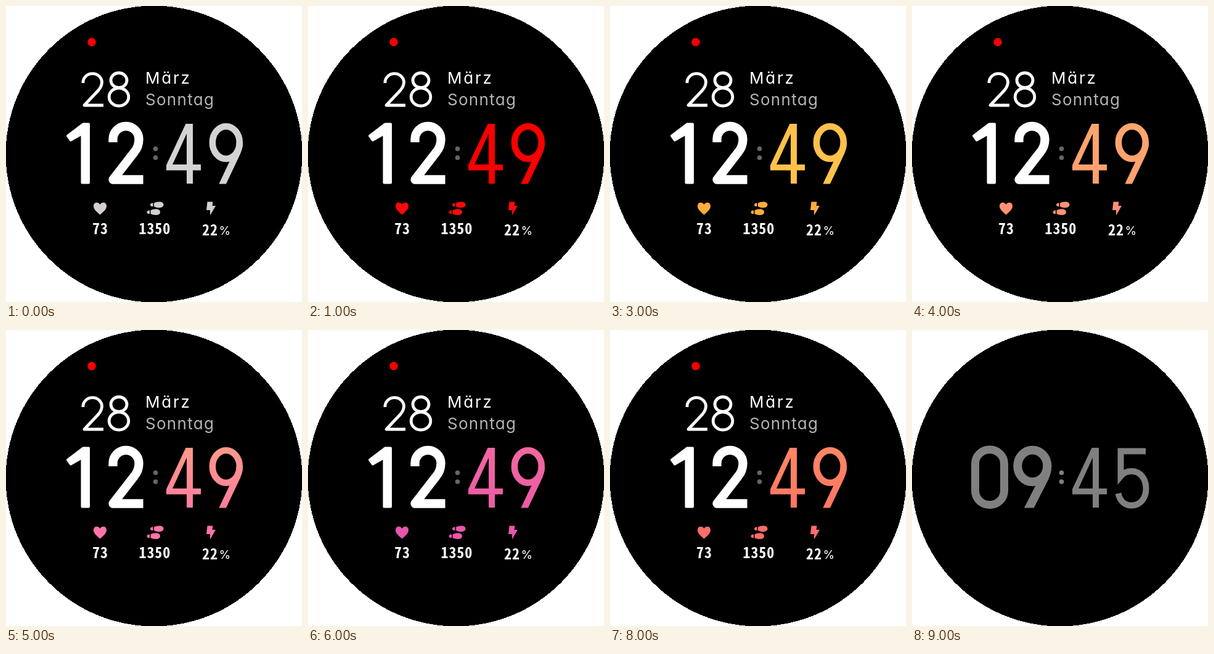
These frames come from a looping animation (480 px wide and 480 px high, 10 s). An HTML page:

```html
<!DOCTYPE html>
<html lang="de">
<head>
<meta charset="utf-8">
<title>Zifferblatt</title>
<style>
  html, body { margin: 0; width: 100%; height: 100%; overflow: hidden; background: #fff; }
  svg { display: block; width: 100%; height: 100%; }
  .line { fill: none; stroke-linejoin: round; }
  .date { font: 400 26px Inter, sans-serif; font-feature-settings: "cv11"; }
  .stat { font: 700 24px "Noto Sans Mono CJK JP", "Noto Sans CJK JP", monospace; letter-spacing: .9px; fill: #fff; }
</style>
</head>
<body>
<svg viewBox="0 0 480 480">
  <defs>
    <linearGradient id="tint" gradientUnits="userSpaceOnUse" x1="0" y1="189" x2="0" y2="289">
      <stop id="top"/><stop id="bottom" offset="1"/>
    </linearGradient>
    <clipPath id="base"><path d="M0 0H480V288.5H0Z"/></clipPath>
    <path id="four" fill-rule="evenodd" d="M291.5 191H303V257H316V266.500H303V288H293V266.500H260V258ZM293 207L270 257H293Z"/>
  </defs>
  <circle cx="240" cy="240" r="240.5" shape-rendering="crispEdges"/>

  <g id="active">
    <circle cx="139" cy="58.5" r="6.8" fill="#f80000"/>
    <g class="line" stroke="#fff" stroke-width="4.8" role="img" aria-label="28">
      <path d="M125 125V123A15.3 14.500 0 0 1 155.500 123Q155.500 130 150 136.500L127 161H158"/>
      <ellipse cx="183" cy="120.500" rx="13" ry="12"/>
      <ellipse cx="183" cy="147.500" rx="15.800" ry="14.500"/>
    </g>
    <text class="date" x="226" y="126" fill="#fff" letter-spacing="2.8">März</text>
    <text class="date" x="226" y="161" fill="#b4b4b4" letter-spacing="1.3">Sonntag</text>

    <g role="img" aria-label="12">
      <path fill="#fff" stroke="#fff" stroke-width="4" stroke-linejoin="round" d="M100 210.500L125 191.500H134V286.500H123.500V207L105 217.500Z"/>
      <path class="line" stroke="#fff" stroke-width="14.300" d="M173.500 221V216A21 21 0 0 1 215.500 216Q215.500 228 208 237L173.500 281.500H222.500"/>
    </g>
    <g role="img" aria-label="49">
      <use href="#four" fill="url(#tint)"/>
      <g class="line" stroke="url(#tint)" stroke-width="10.500" clip-path="url(#base)">
        <ellipse cx="356.800" cy="221.500" rx="22" ry="26.200"/>
        <path d="M349 293L375 238Q378.800 229 378.800 221"/>
      </g>
    </g>

    <g id="icons">
      <path d="M152.500 338.500C147 333.500 142 330 142 324.500C142 318 149.500 317 152.500 322C155.500 317 163 318 163 324.500C163 330 158 333.500 152.500 338.500Z"/>
      <g id="foot">
        <path d="M240 319.500C245 316.500 255.500 316.500 255.500 322C255.500 328 246 328.500 240 325Z"/>
        <path d="M238.500 319.500V325C232.500 326 232.500 318.500 238.500 319.500Z"/>
      </g>
      <use href="#foot" transform="matrix(1 0 0 -1 -5.500 656.500)"/>
      <path d="M326.500 317.500H335.500L334.500 324H340L331 339.500V331H325Z"/>
    </g>
    <text class="stat" x="140" y="370">73</text>
    <text class="stat" x="215.500" y="370">1350</text>
    <text class="stat" x="318" y="371.500">22</text>
    <text x="345.500" y="371" fill="#fff" font-family="Inter, sans-serif" font-size="19">%</text>
  </g>

  <g id="ambient" fill="none" stroke="#808080" stroke-linejoin="round" role="img" aria-label="09:45">
    <rect x="102.500" y="194" width="47" height="89.500" rx="23" stroke-width="13"/>
    <g stroke-width="14" clip-path="url(#base)">
      <ellipse cx="195.300" cy="220.500" rx="24" ry="25.800"/>
      <path d="M187.500 293L214.500 240Q219.300 230 219.300 220"/>
    </g>
    <use href="#four" fill="#808080" stroke="none"/>
    <path stroke-width="10" stroke-linejoin="miter" d="M379 196.500H338.500V237Q345 229 356 229C370 229 379.500 241 379.500 257C379.500 273 370 284.500 356 284.500C345 284.500 337 277 334.500 265"/>
  </g>

  <g id="colon">
    <circle cx="242.500" cy="231.500" r="3.800"/>
    <circle cx="242.500" cy="246" r="3.800"/>
  </g>
</svg>
<script>
const STEP = 1000, LOOP = 10000;
// digit top, digit bottom, icons
const themes = [
  ['#d3d3d3', '#d3d3d3', '#d6cfcf'],
  ['#fa0000', '#fa0000', '#fa0a0a'],
  ['#ff6a1e', '#ff6a1e', '#ff6420'],
  ['#ffc14a', '#ffc14a', '#ffad3c'],
  ['#ffa56c', '#ffa070', '#ff9275'],
  ['#ff9a88', '#ff7d9f', '#ff73a9'],
  ['#f268a0', '#ea5ba6', '#e856ac'],
  ['#de30a4', '#d932ac', '#d233b0'],
  ['#ff8764', '#ff7564', '#ff6c6c']
];
const $ = id => document.getElementById(id);
const show = (el, on) => el.setAttribute('display', on ? 'inline' : 'none');
let current = -1;

function render(time) {
  const step = Math.floor((time % LOOP) / STEP);
  if (step === current) return;
  current = step;
  const theme = themes[step];
  show($('active'), theme);
  show($('ambient'), !theme);
  $('colon').setAttribute('fill', theme ? '#666' : '#808080');
  if (!theme) return;
  $('top').setAttribute('stop-color', theme[0]);
  $('bottom').setAttribute('stop-color', theme[1]);
  $('icons').setAttribute('fill', theme[2]);
}

const start = performance.now();
function tick() {
  render(performance.now() - start);
  requestAnimationFrame(tick);
}
tick();
</script>
</body>
</html>
```
